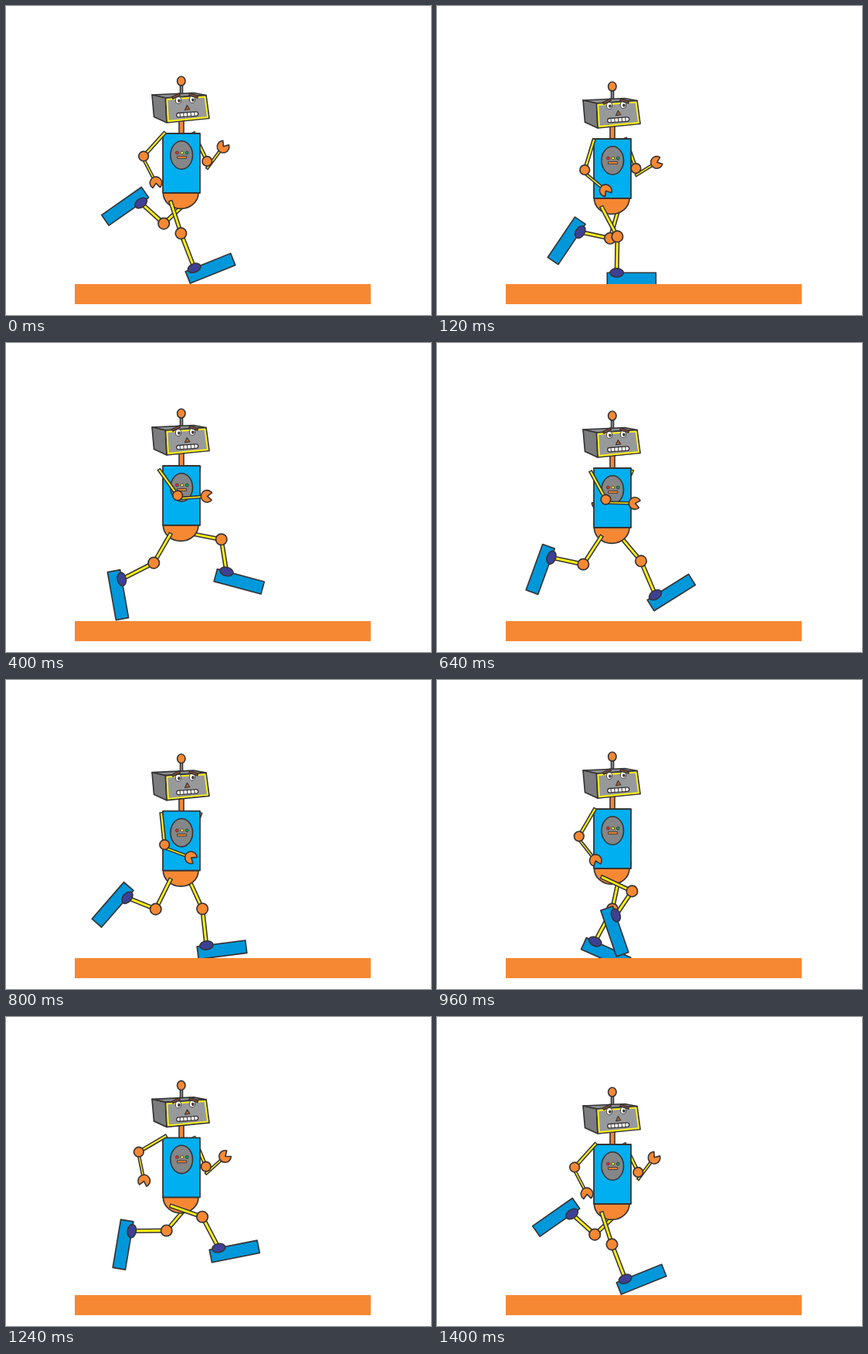
Recreate the animation shown at these times as an HTML page with a canvas. Size 550 by 400 pixels, loop 1440 ms.

```html
<!DOCTYPE html>
<html lang="en">
<head>
<meta charset="utf-8">
<title>Running robot</title>
<style>
html, body { margin: 0; width: 100%; height: 100%; overflow: hidden; background: #fff; }
canvas { display: block; width: 550px; height: 400px; }
</style>
</head>
<body>
<canvas id="stage" width="550" height="400"></canvas>
<script>
const LOOP = 1440, STEP = 40, STRIDE = 680, CYCLE = 2 * STRIDE, RAD = Math.PI / 180;
const INK = '#373435', ORANGE = '#f78833', YELLOW = '#fff212', BLUE = '#0098da',
  CYAN = '#00afef', NAVY = '#3e4095', GRAY = '#848688', FACE = '#98999b';
const c = document.getElementById('stage').getContext('2d');
c.lineJoin = 'round';

// Height of the torso over one stride: time, y
const BOUNCE = [[0, 165], [120, 172], [240, 167], [400, 159], [560, 155.5], [640, 162], [STRIDE, 165]];

// One leg over two strides: time, then thigh, shin and foot in degrees.
// Thigh and shin swing forward from straight down; the foot turns clockwise.
const GAIT = [
  [0, 18, 21, -22],
  [120, 28, -1, 0],
  [240, -12, -28, 24],
  [400, -30, -63, 80],
  [560, -44, -98, 106],
  [640, -33, -102, 110],
  [680, -47, -132, 145],
  [800, -16, -102, 124],
  [920, 65, -34, 71],
  [1080, 79, 9, 15],
  [1240, 68, 34, -20],
  [1320, 40, 23, -32],
  [CYCLE, 18, 21, -22]
];

function pose(keys, t) {
  const n = keys.findIndex(k => k[0] > t);
  if (n < 0) return keys[keys.length - 1].slice(1);
  const a = keys[n - 1], b = keys[n], f = (t - a[0]) / (b[0] - a[0]);
  return a.slice(1).map((v, i) => v + (b[i + 1] - v) * f);
}

const wave = (t, peak) => Math.cos((t - peak) / CYCLE * 2 * Math.PI);
const reach = ([x, y], deg, len) => [x + len * Math.sin(deg * RAD), y + len * Math.cos(deg * RAD)];

function paint(fill, width = 1.7, ink = INK) {
  if (fill) { c.fillStyle = fill; c.fill(); }
  if (width) { c.lineWidth = width; c.strokeStyle = ink; c.stroke(); }
}

function poly(points, fill, width, ink) {
  c.beginPath();
  points.forEach(p => c.lineTo(...p));
  c.closePath();
  paint(fill, width, ink);
}

function oval(x, y, rx, ry, fill, width, turn = 0) {
  c.beginPath();
  c.ellipse(x, y, rx, ry, turn, 0, 7);
  paint(fill, width);
}

function box(x, y, w, h, fill, width) {
  c.beginPath();
  c.rect(x, y, w, h);
  paint(fill, width);
}

function line(x1, y1, x2, y2, width, ink) {
  c.beginPath();
  c.moveTo(x1, y1);
  c.lineTo(x2, y2);
  paint(null, width, ink);
}

function rod([x1, y1], [x2, y2], w, fill = YELLOW) {
  const d = Math.hypot(x2 - x1, y2 - y1) || 1;
  const ex = (x2 - x1) / d * 1.4, ey = (y2 - y1) / d * 1.4;
  line(x1 - ex, y1 - ey, x2 + ex, y2 + ey, w, INK);
  line(x1, y1, x2, y2, w - 3.1, fill);
}

function turned([x, y], angle, shape) {
  c.save();
  c.translate(x, y);
  c.rotate(angle);
  shape();
  c.restore();
}

function leg(hip, t) {
  const [thigh, shin, foot] = pose(GAIT, t % CYCLE);
  const knee = reach(hip, thigh, 43.5);
  // the shin foreshortens as the knee bends
  const ankle = reach(knee, shin, 39 + 9 * Math.cos((thigh - shin) * RAD));
  rod(hip, knee, 5.8);
  rod(knee, ankle, 6);
  turned(ankle, foot * RAD, () => {
    box(-12.3, 0, 63, 16.5, BLUE);
    oval(0, 0, 8.7, 5.6, NAVY, 1.6);
  });
  oval(...knee, 7.2, 7.2, ORANGE);
}

function arm(shoulder, upper, fore, len, drop) {
  const elbow = reach(shoulder, upper, 41), hand = reach(elbow, fore, len);
  rod(shoulder, elbow, 5.2);
  rod([elbow[0], elbow[1] + drop], hand, 4.5);
  oval(...elbow, 6.3, 6.3, ORANGE);
  turned(hand, (90 - fore) * 1.3 * RAD, () => {
    c.beginPath();
    c.arc(0, 0, 7.8, 0.65, -0.65);
    c.lineTo(0.5, 0);
    c.closePath();
    paint(ORANGE, 1.6);
  });
}

function eye(x, y) {
  oval(x, y, 3.6, 4.4, '#fff', 0.9);
  oval(x + 0.9, y + 0.6, 1.7, 2.2, INK, 0);
}

function head() {
  box(225.4, 102, 3.2, 13, GRAY, 1.4);
  oval(226.8, 97.2, 5.2, 5.9, ORANGE, 1.6);
  poly([[189, 115], [206.5, 119], [259, 115.5], [243, 112.5]], '#8c8d8f');
  poly([[189, 115], [206.5, 119], [208, 151], [191.5, 143.5]], '#7c7d7f');
  poly([[206.5, 119], [259, 115.5], [263, 145.5], [208, 151]], FACE);
  poly([[208.4, 121], [257.5, 117.6], [261, 144], [210, 149]], null, 1.9, YELLOW);
  eye(223, 122);
  eye(241, 121);
  rod([216, 118.8], [224, 114.6], 4.2, '#a5522c');
  rod([238, 114.4], [247.5, 117.6], 4.2, '#a5522c');
  poly([[234.3, 128.5], [237.8, 133.8], [231.5, 134.8]], '#b5622b', 1.1);
  turned([234.7, 140.4], -0.07, () => {
    c.beginPath();
    c.roundRect(-14, -2.7, 28, 5.4, 2.7);
    paint('#fff', 1.3);
    for (let x = -9.5; x < 12; x += 4.7) line(x, -2.7, x, 2.7, 1);
  });
}

function body() {
  box(224, 148, 6, 18, ORANGE, 1.6);
  c.beginPath();
  c.ellipse(226.2, 242, 22.8, 20.4, 0, 0, Math.PI);
  c.closePath();
  paint(ORANGE);
  box(203, 165, 48, 77, CYAN, 1.8);
  oval(227.2, 193, 14.3, 18.2, GRAY, 1.6);
  ['#e5343a', YELLOW, '#00a859'].forEach((tone, i) =>
    oval(221.4 + 6.4 * i, 190, 1.9, 1.9, tone, 0.8));
  box(221.6, 194.6, 12, 2.8, ORANGE, 0.9);
  head();
}

function draw(time) {
  // each stride holds its last pose for one step
  const inStride = Math.min(time % (LOOP / 2), STRIDE);
  const t = inStride + (time < LOOP / 2 ? 0 : STRIDE);
  const [y] = pose(BOUNCE, inStride);
  const near = wave(t, 490), far = wave(t, 1320);

  c.fillStyle = '#fff';
  c.fillRect(0, 0, 550, 400);
  arm([247.5 - 5 * far, y + 1 - 2 * far], 1 + 25 * far, 27 + 107 * far, 28, 9);
  leg([236, y + 87], t + STRIDE);
  turned([0, y - 165], 0, body);
  leg([213, y + 88], t);
  arm([202.5 - 4.7 * near, y + 1.5 + 4 * near], -10 + 50 * near, 51 + 41 * near, 38, 4);
  box(89, 360, 383, 26, ORANGE, 0);
}

const start = performance.now();
function tick() {
  const t = (performance.now() - start) % LOOP;
  draw(Math.floor(t / STEP) * STEP);
  requestAnimationFrame(tick);
}
tick();
</script>
</body>
</html>
```
